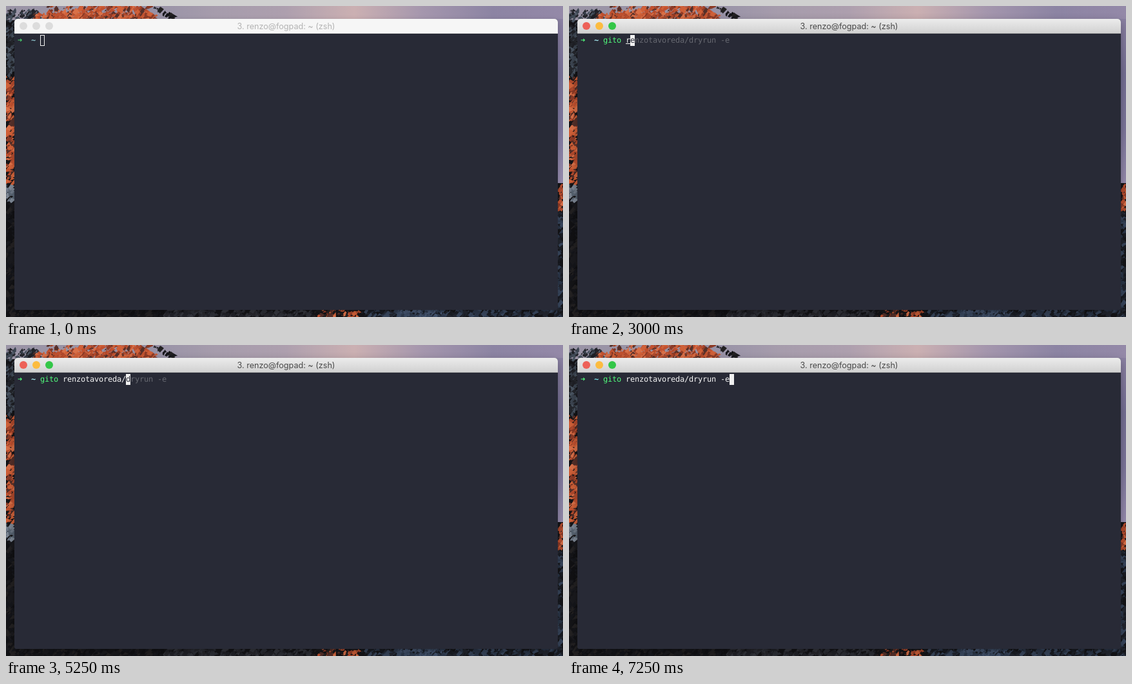
These frames come from a looping animation (864 px wide and 483 px high, 8000 ms). An HTML page with a canvas:

```html
<!DOCTYPE html>
<html lang="en">
<head>
<meta charset="utf-8">
<title>Terminal</title>
<style>
html, body { margin: 0; width: 864px; height: 483px; overflow: hidden; background: #141417; }
canvas { position: absolute; left: 0; top: 0; }
#win {
  position: absolute; left: 13px; top: 20px; width: 843px; height: 452px;
  border-radius: 5px 5px 3px 3px; overflow: hidden; background: #282a36;
  box-shadow: 0 5px 14px rgba(0,0,0,.3);
}
#bar {
  height: 22px; border-bottom: 1px solid #aaa; background: linear-gradient(#ececec, #d1d1d1);
  font: 12.6px/23px Inter, sans-serif; color: #494949; text-align: center;
}
#bar i { position: absolute; top: 5px; width: 12px; height: 12px; border-radius: 50%; }
#line, #line b {
  position: absolute; top: 25px; white-space: pre; text-rendering: geometricPrecision;
  font: 12px/17px "DejaVu Sans Mono", "Liberation Mono", monospace; letter-spacing: -.2246px;
}
#line { left: 40px; color: #f4f4f4; }
#line b { top: 0; font-weight: bold; }
#arrow { left: -35px; color: #50fa7b; }
#tilde { left: -14px; color: #a5e8f0; }
#cmd { color: #50fa7b; }
#cmd.bad { color: #ff5555; font-weight: bold; }
#arg.path { text-decoration: underline; }
#hint { color: #666870; }
#cursor { position: absolute; top: 0; width: 7px; height: 17px; background: #f1f1f1; color: #282a36; }
#win.idle { box-shadow: 0 3px 9px rgba(0,0,0,.22); }
.idle #bar { background: #f6f6f6; color: #b3b3b3; border-color: #d4d4d4; }
.idle #bar i { background: #dcdcdc !important; }
.idle #line b { opacity: .8; }
.idle #cursor { background: none; box-shadow: inset 0 0 0 1px #f1f1f1; }
</style>
</head>
<body>
<canvas id="bg" width="864" height="483"></canvas>
<div id="win">
  <div id="bar">
    <i style="left:8px;background:#ed6158"></i><i style="left:28px;background:#fcbc40"></i><i style="left:48px;background:#34c748"></i>
    3. renzo@fogpad: ~ (zsh)
  </div>
  <div id="line"><b id="arrow">➜</b><b id="tilde">~</b><span id="cmd"></span><span id="gap"></span><span id="arg"></span><span id="hint"></span><span id="cursor"></span></div>
</div>
<script>
const $ = id => document.getElementById(id);
const g = $('bg').getContext('2d');

let seed = 7;
const rnd = () => (seed = seed * 16807 % 2147483647) / 2147483647;

// Fills a box with a gradient of evenly spaced colours
function sky(x, y, w, h, across, colors) {
  const fill = g.createLinearGradient(x, y, across ? x + w : x, across ? y : y + h);
  colors.forEach((color, i) => fill.addColorStop(i / (colors.length - 1), color));
  g.fillStyle = fill;
  g.fillRect(x, y, w, h);
}

// Covers a box with small slanted facets; lean shifts its lower edge sideways
function rocks(x, y, w, h, size, lean, colors) {
  const count = 4 * w * h / size ** 2;
  for (let i = 0; i < count; i++) {
    const v = rnd(), s = size * (.4 + rnd());
    const px = x + rnd() * w + lean * v, py = y + v * h;
    g.fillStyle = colors[i % colors.length];
    g.beginPath();
    g.moveTo(px, py - s * .5);
    g.lineTo(px + s * rnd(), py);
    g.lineTo(px - s * .3 * rnd(), py + s * rnd());
    g.lineTo(px - s * .6, py + s * .3);
    g.fill();
  }
}

function drawBackdrop() {
  const ember = ['#c0512f', '#cf6038', '#8d3b27', '#d97048', '#55302a', '#b04a2d'];
  const dark = ['#1a1a1e', '#111114', '#232122', '#15161b'];
  const slate = ['#2b3648', '#191c23', '#38465c', '#22262f'];
  const cliff = ['#3c4551', '#25272d', '#4a5562', '#1f2026'];

  sky(0, 0, 864, 22, true,
    ['#9a94a6', '#9a94a6', '#9691a6', '#a69cac', '#ad9fae', '#cbb0b2', '#a496ad', '#8c84a3', '#9489a8']);
  sky(850, 20, 14, 255, false, ['#8a80a2', '#756f94', '#7d769b', '#968cae']);

  // Peaks along the top
  rocks(0, 7, 50, 13, 6, 0, cliff);
  rocks(222, 0, 10, 20, 6, 36, dark);
  rocks(66, 0, 155, 20, 7, 0, ember);
  rocks(44, 12, 190, 8, 6, 0, ember);

  // Left edge, downwards
  rocks(0, 20, 14, 86, 7, 0, cliff);
  rocks(0, 300, 14, 183, 8, 0, dark);
  rocks(0, 278, 14, 24, 6, 0, ['#6f7988', '#7d8794', '#566270']);
  rocks(0, 110, 14, 165, 8, 0, ember);

  // Right edge, downwards
  rocks(855, 320, 9, 163, 7, 0, slate);
  rocks(857, 277, 7, 40, 6, 0, ember);

  // Bottom edge, rightwards
  rocks(0, 472, 245, 11, 7, 0, dark);
  rocks(245, 472, 230, 11, 7, 0, ['#2c2e35', '#202127', '#34363d', '#26262b']);
  rocks(550, 472, 314, 11, 7, 0, slate);
  rocks(605, 472, 75, 11, 6, 0, ['#3a4960', '#2e3a4d', '#44546e']);
  rocks(475, 472, 72, 11, 6, 0, [...ember, ...dark]);
}

const text = 'gito renzotavoreda/dryrun -e';
const cmdEnd = text.indexOf(' ');
const slash = text.indexOf('/');

// Keys pressed in each quarter second of typing
const rhythm = '221122212210101212111';
const typedAt = t => [...rhythm.slice(0, Math.max(0, Math.floor(t / 250) - 8))].reduce((sum, k) => sum + +k, 0);

function render(t) {
  const n = typedAt(t);
  $('win').className = t < 500 ? 'idle' : '';
  $('cmd').textContent = text.slice(0, Math.min(n, cmdEnd));
  $('cmd').className = n < cmdEnd ? 'bad' : '';
  $('gap').textContent = n > cmdEnd ? ' ' : '';
  $('arg').textContent = text.slice(cmdEnd + 1, Math.max(n, cmdEnd + 1));
  $('arg').className = n <= slash ? 'path' : '';
  $('hint').textContent = n ? text.slice(n) : '';
  $('cursor').textContent = n ? text.charAt(n) : '';
  $('cursor').style.left = n * 7 + 'px';
  $('tilde').style.color = t < 6250 ? '' : '#78e3ea';
}

const start = performance.now();
function tick() {
  render((performance.now() - start) % 8000);
  requestAnimationFrame(tick);
}

drawBackdrop();
tick();
</script>
</body>
</html>
```
